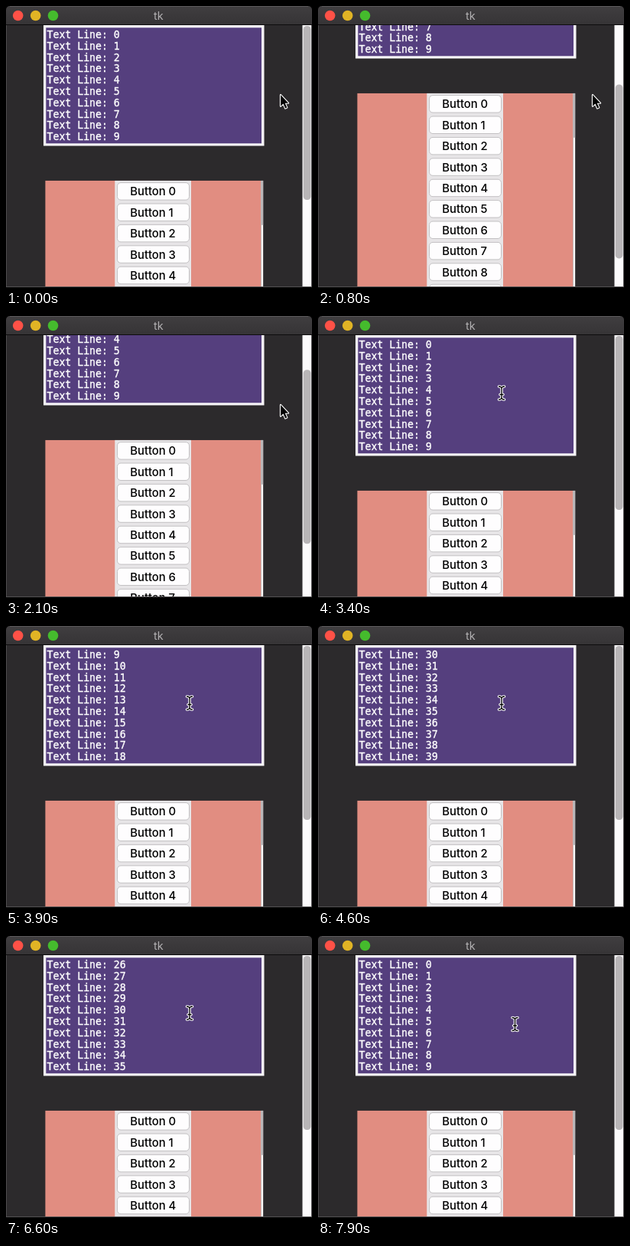
Animation of 400x368 px, one loop 8 s. Source, as an HTML page with a canvas:

```html
<!DOCTYPE html>
<html lang="en">
<head>
<meta charset="utf-8">
<title>tk</title>
<style>
  html, body { margin: 0; width: 100%; height: 100%; overflow: hidden; background: #000; }
  canvas { display: block; }
</style>
</head>
<body>
<canvas id="stage" width="400" height="368"></canvas>
<script>
const ctx = document.getElementById('stage').getContext('2d');
const LOOP = 8000, STEP = 100;
const SANS = 'Inter, sans-serif', MONO = '"DejaVu Sans Mono", monospace';

// Keys are [time, value]; each segment is eased at both ends.
const pageKeys = [[0, 0], [400, 60], [500, 60], [1100, 169], [1700, 169], [2400, 0]];
const lineKeys = [[3500, 0], [4600, 30], [5200, 41], [6100, 41], [7300, 0]];
const cursorX = [[2600, 358.5], [3300, 240], [7300, 240], [7800, 257.5]];
const cursorY = [[2600, 115], [3300, 100], [7300, 100], [7800, 114.5]];

function valueAt(keys, t) {
  const i = keys.findIndex(key => key[0] > t);
  if (i === 0) return keys[0][1];
  if (i < 0) return keys[keys.length - 1][1];
  const [t0, v0] = keys[i - 1], [t1, v1] = keys[i];
  const u = (t - t0) / (t1 - t0);
  return v0 + (v1 - v0) * u * u * (3 - 2 * u);
}

function rect(x, y, w, h, color) {
  ctx.fillStyle = color;
  ctx.fillRect(x, y, w, h);
}

function pill(x, y, w, h, r, fill, stroke) {
  ctx.beginPath();
  ctx.roundRect(x, y, w, h, r);
  ctx.fillStyle = fill;
  ctx.fill();
  if (stroke) {
    ctx.strokeStyle = stroke;
    ctx.lineWidth = 1;
    ctx.stroke();
  }
}

// A thin stroke of the text colour gives the glyphs a medium weight.
function label(text, x, y, font, color, weight = 0) {
  ctx.font = font;
  ctx.fillStyle = ctx.strokeStyle = color;
  ctx.fillText(text, x, y);
  if (weight) {
    ctx.lineWidth = weight;
    ctx.strokeText(text, x, y);
  }
}

function clipped(x, y, w, h, draw) {
  ctx.save();
  ctx.beginPath();
  ctx.rect(x, y, w, h);
  ctx.clip();
  draw();
  ctx.restore();
}

function drawTextBox(top, firstLine) {
  rect(49, top, 288.5, 157.5, '#f7f5f8');
  rect(52.3, top + 3.3, 281.7, 151, '#553f7e');
  for (let row = 0; row < 10 && firstLine + row < 50; row++) {
    label('Text Line: ' + (firstLine + row), 53.5, top + 17 + row * 14.8,
      '13.2px ' + MONO, '#fff', 0.35);
  }
}

function drawButton(n, top) {
  const extra = n > 9 ? 3.5 : 0;
  pill(145.5 - extra, top, 94 + 2 * extra, 22.5, 4.5, '#fefdfe', '#c3c1c3');
  label('Button ' + n, 162.3 - extra, top + 16.8, '500 14.8px ' + SANS, '#000');
}

function drawButtonList(top) {
  clipped(51.4, top, 285, 285, () => {
    rect(51, top, 282.4, 285, '#e18d81');
    rect(333.4, top, 3, 285, '#fbf9fa');
    rect(333.4, top, 3, 58, '#b9b6b8');
    rect(142.3, top, 99.7, 285, '#e7e5e7');
    rect(138, top + 274, 107, 11, '#e7e5e7');
    for (let n = 0; n <= 10; n++) drawButton(n, top + 2.8 + n * 27.4 + (n > 9 ? 1 : 0));
  });
}

function drawTitleBar() {
  const shade = ctx.createLinearGradient(0, 0, 0, 24);
  shade.addColorStop(0, '#403e40');
  shade.addColorStop(1, '#363436');
  pill(0, 0, 400, 24, [5, 5, 0, 0], shade);
  rect(5, 0, 390, 1, '#5a585a');
  rect(0, 24, 400, 1, '#0d0c0d');
  [[15.7, '#ff5147'], [38.7, '#e1b425'], [61.5, '#45bb2d']].forEach(([x, color]) =>
    pill(x - 6.8, 5.7, 13.6, 13.6, 6.8, color));
  label('tk', 193, 18, '14.5px ' + SANS, '#b2b0b2');
}

function outlined(path, width, fill) {
  ctx.lineJoin = ctx.lineCap = 'round';
  ctx.lineWidth = width;
  ctx.strokeStyle = '#fff';
  ctx.stroke(path);
  if (fill) {
    ctx.fillStyle = '#000';
    ctx.fill(path);
  } else {
    ctx.lineWidth = 1.3;
    ctx.strokeStyle = '#000';
    ctx.stroke(path);
  }
}

const arrow = new Path2D('M.5 1V15.8L4 12.6L6.6 18.6L8.8 17.6L6.2 11.7H10.6Z');
const beam = new Path2D('M-3.5-8Q0-8 0-5Q0-8 3.5-8M0-5V6M-3.5 9Q0 9 0 6Q0 9 3.5 9M-2 2.5H2');

function drawCursor(x, y) {
  ctx.save();
  ctx.translate(x, y);
  if (x > 337) outlined(arrow, 2.2, true);
  else outlined(beam, 3.6, false);
  ctx.restore();
}

function draw(t) {
  const scroll = Math.floor(valueAt(pageKeys, t));
  rect(0, 0, 400, 368, '#000');
  rect(0, 25, 400, 342, '#2c2a2c');
  clipped(0, 25, 400, 341, () => {
    drawTextBox(25 - scroll, Math.round(valueAt(lineKeys, t)));
    drawButtonList(227.8 - scroll);
    rect(387.5, 25, 11.5, 341, '#fbfafb');
    pill(388.7, 26 + scroll * 0.67, 9.8, 227, 4.5, '#b8b5b7');
  });
  rect(0, 25, 1, 342, '#4b494b');
  rect(399, 25, 1, 342, '#4b494b');
  rect(0, 366, 400, 1, '#555355');
  drawTitleBar();
  drawCursor(valueAt(cursorX, t), valueAt(cursorY, t));
}

function tick() {
  draw(Math.floor(performance.now() / STEP) * STEP % LOOP);
  requestAnimationFrame(tick);
}
tick();
</script>
</body>
</html>
```
